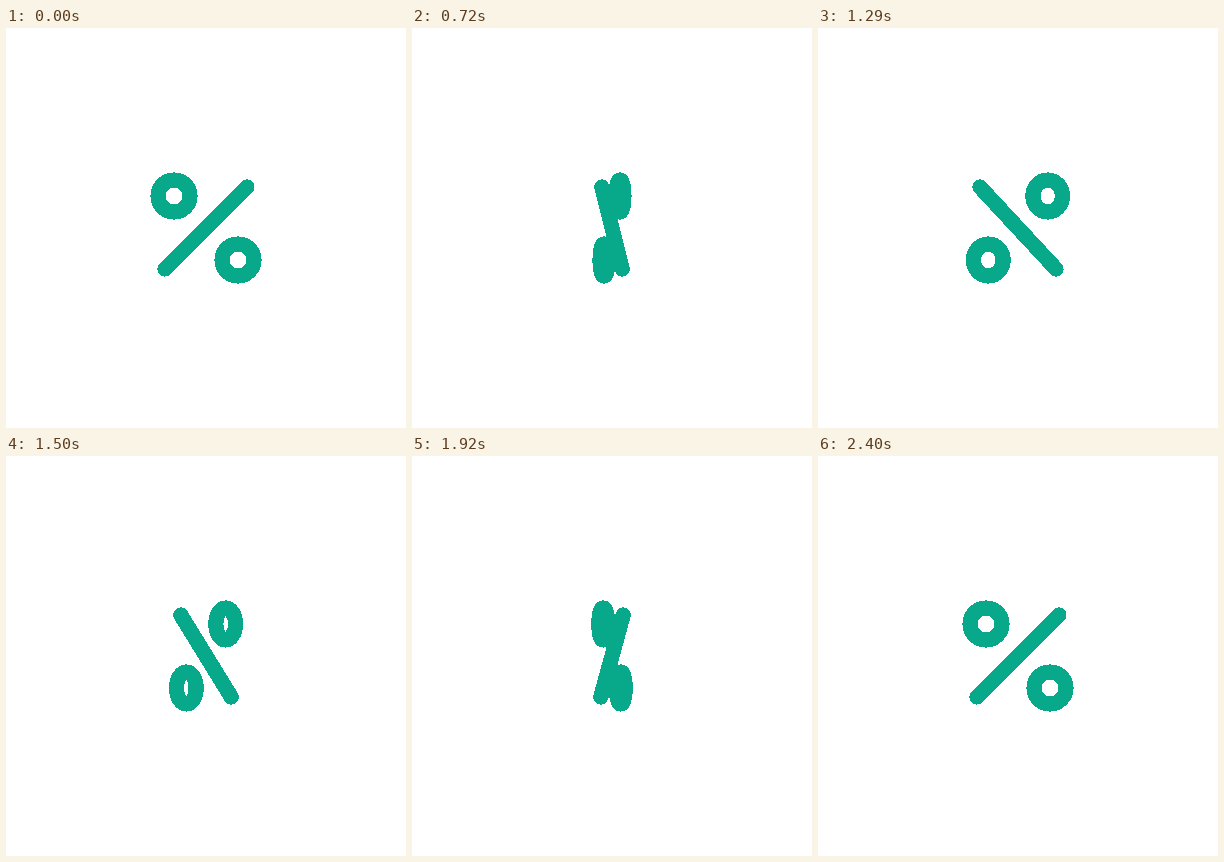
Write an HTML page that moves like this. It is 400 px wide and 400 px high and loops after 2.46 s.

```html
<!DOCTYPE html>
<html lang="en">
<head>
<meta charset="utf-8">
<title>Turning percent sign</title>
<style>
  html, body { margin: 0; width: 100%; height: 100%; overflow: hidden; background: #fff; }
  svg { display: block; width: 400px; height: 400px; }
  g { fill: none; stroke: #08a88a; stroke-width: 15.2; stroke-linecap: round; stroke-linejoin: round; }
</style>
</head>
<body>
<svg viewBox="-200 -200 400 400" shape-rendering="crispEdges">
  <g>
    <ellipse id="upper" cy="-32" ry="16"/>
    <ellipse id="lower" cy="32" ry="16"/>
    <line id="bar" y1="41" y2="-41"/>
  </g>
</svg>
<script>
const LOOP = 2460, STEP = 30, LAST_STEP = 80;
const RING_OFFSET = 32, RING_RADIUS = 16, BAR_REACH = 41;
const [upper, lower, bar] = ['upper', 'lower', 'bar'].map(id => document.getElementById(id));

// Cubic ease through (0.25, 0) and (0.75, 1), solved by bisection.
function ease(x) {
  let low = 0, high = 1;
  for (let i = 0; i < 24; i++) {
    const u = (low + high) / 2, v = 1 - u;
    const at = 0.75 * u * v * v + 2.25 * u * u * v + u * u * u;
    if (at < x) low = u; else high = u;
  }
  return low * low * (3 - 2 * low);
}

// Horizontal scale: 1 at rest, negative when mirrored.
function turnAt(time) {
  const step = Math.min(Math.floor((time % LOOP) / STEP), LAST_STEP);
  const progress = 1 - Math.abs(step / (LAST_STEP / 2) - 1);
  return 1 - 1.975 * ease(progress);
}

function setAll(element, attributes) {
  for (const name in attributes) element.setAttribute(name, attributes[name]);
}

// Only the outline turns; the stroke keeps its width.
function draw(time) {
  const turn = turnAt(time);
  const rx = Math.max(Math.abs(turn) * RING_RADIUS, 0.05);
  setAll(upper, { cx: -RING_OFFSET * turn, rx });
  setAll(lower, { cx: RING_OFFSET * turn, rx });
  setAll(bar, { x1: -BAR_REACH * turn, x2: BAR_REACH * turn });
}

const start = performance.now();
function tick() {
  draw(performance.now() - start);
  requestAnimationFrame(tick);
}
tick();
</script>
</body>
</html>
```
